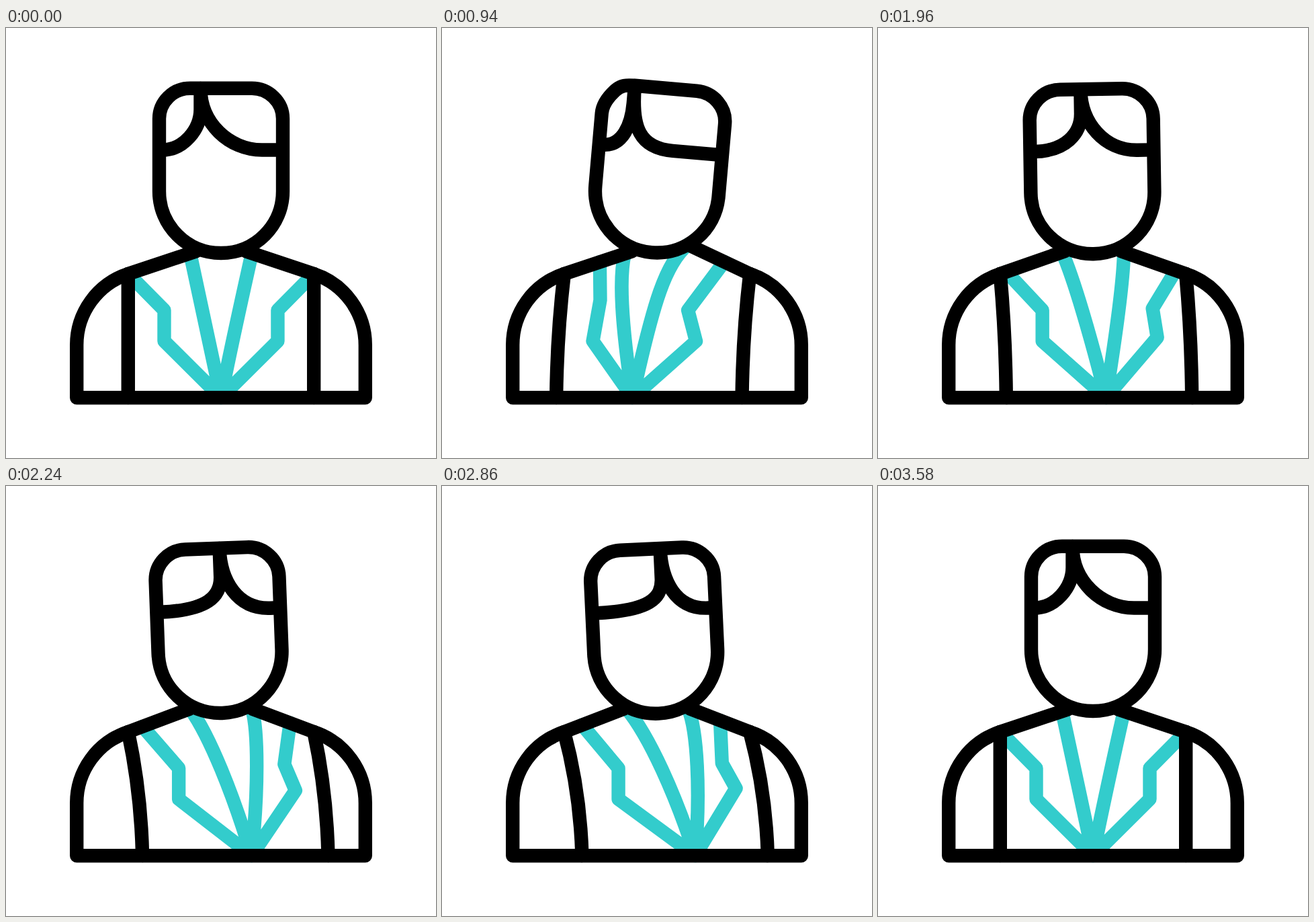
An HTML page that plays this animation: 640x640 px, repeating every 3600 ms.

```html
<!DOCTYPE html>
<html>
<head>
<meta charset="utf-8">
<style>
html, body { margin: 0; width: 100%; height: 100%; overflow: hidden; background: #fff }
svg { display: block; width: 100vw; height: 100vh }
path { fill: none; stroke: #000; stroke-width: 20.4; stroke-linecap: round; stroke-linejoin: round }
#lapels { stroke: #33cccc }
</style>
</head>
<body>
<svg viewBox="0 0 640 640">
  <path id="lapels"/>
  <path id="seams"/>
  <path d="M182 366C136 381 105.2 424 105.2 472V550.2H534.8V472C534.8 424 504 381 458 366"/>
  <path id="neck"/>
  <g id="head"><path id="face"/><path id="hair"/></g>
</svg>
<script>
const LOOP = 3600, SEAM_LEFT = 181.8, SEAM_RIGHT = 458.2;
const $ = id => document.getElementById(id);
const setPath = (id, d) => $(id).setAttribute('d', d);

// Rises from 0 to 1 at peak and falls back to 0
function swing(t, start, peak, end, powIn, powOut) {
  if (t <= start || t >= end) return 0;
  return t < peak
    ? 1 - ((peak - t) / (peak - start)) ** powIn
    : 1 - ((t - peak) / (end - peak)) ** powOut;
}

// l and r: how far the man is turned to the left and to the right, 0 to 1
function drawTorso(l, r) {
  const slopeLeft = 0.333 + 0.057 * r;
  const slopeRight = slopeLeft + 0.14 * l;
  const onLeft = x => `${x} ${366 - slopeLeft * (x - SEAM_LEFT)}`;
  const onRight = x => `${x} ${366 - slopeRight * (SEAM_RIGHT - x)}`;

  setPath('neck',
    `M${onLeft(SEAM_LEFT)}L${onLeft(283 - 13 * r)}` +
    `M${onRight(SEAM_RIGHT)}L${onRight(357 + 11 * l + 13 * r)}`);

  const bend = 29 * r - 11.7 * l;
  setPath('seams', [SEAM_LEFT, SEAM_RIGHT].map(x =>
    `M${x} 366Q${x + 0.9 * bend} 455 ${x + bend} 550`).join(''));

  const button = `${320 - 36.5 * l + 62 * r} 550`;
  const leftEdge = 235.5 + 29.5 * r;
  setPath('lapels',
    `M${onLeft(182 + 53 * l + 29 * r)}L${leftEdge} ${420 - 15 * l}` +
    `L${leftEdge - 11 * l} 466L${button}` +
    `M${onRight(458 - 38 * l - 48 * r)}L${404.5 - 38.5 * l + 13.4 * r} ${420 - 8 * r}` +
    `L${404.5 - 26.5 * l + 36 * r} ${466 - 17.5 * r}L${button}` +
    `M${onLeft(274 - 2 * l)}C${282 - 19 * l + 29 * r} 372 ` +
    `${301 - 34 * l + 51 * r} ${460 - 20 * l} ${button}` +
    `M${onRight(366)}C${358 - 25 * l + 24 * r} ${372 - 22 * l - 10 * r} ` +
    `${339 - 24 * l + 50 * r} ${455 - 50 * l} ${button}`);
}

// The head tilts as a whole while the hair parting slides across it
function drawHead(l, r) {
  $('head').setAttribute('transform',
    `translate(${-2 * r} ${4.1 * r - 0.5 * l}) rotate(${5 * l - 2.9 * r} 320 243)`);

  setPath('face',
    `M228 243V135C228 122 ${233 + 3 * l} ${111.5 - 2 * l} ${241.5 + 3 * l} ${103 - 3 * l}` +
    'S261 89.7 274 89.7H366C391 89.7 412 110 412 135V243' +
    'C412 294 371 335 320 335S228 294 228 243Z');

  const shift = 48 * r - 16 * l;
  const part = 289.5 + shift;
  const fold = 121 + 0.3 * shift;
  const sweep = 381 - 43 * l + 22 * r;
  setPath('hair',
    `M${part} 90V${fold}C${part} ${fold + 30} ${264 + 54 * r} 181.5 233 181.5` +
    `M${part} 90C${part} ${141 + 12 * l - 4 * r} ${sweep - 49} 181.5 ${sweep} 181.5H408`);
}

const begin = performance.now();
function tick() {
  const t = (performance.now() - begin) % LOOP;
  const l = swing(t, 0, 905, 1810, 1.47, 2);
  const r = swing(t, 1810, 2700, 3580, 2, 1.47);
  drawTorso(l, r);
  drawHead(l, r);
  requestAnimationFrame(tick);
}
tick();
</script>
</body>
</html>
```
